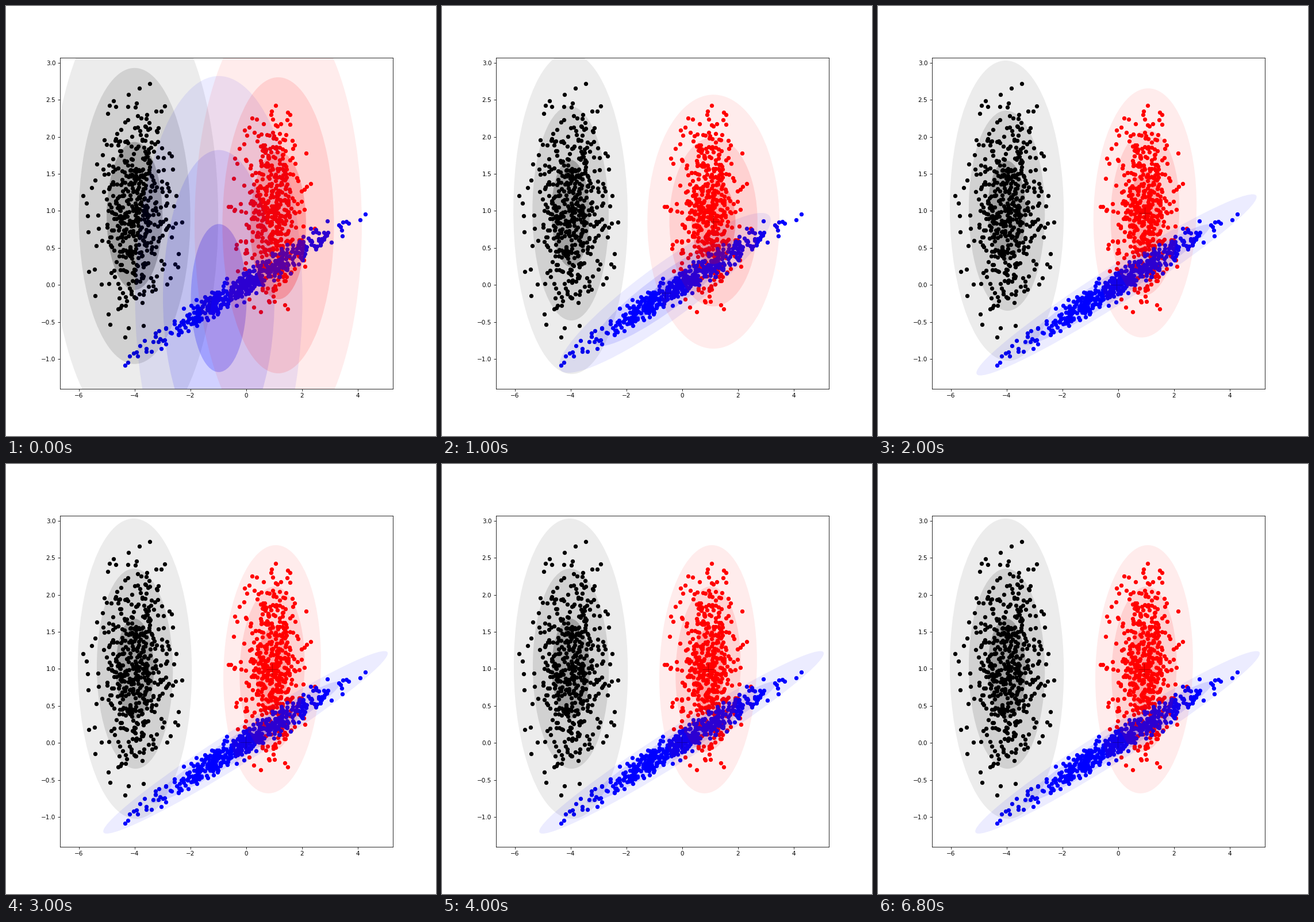
A matplotlib script that plays this animation: 748 px wide and 748 px high, repeating every 8 s.

```python
import numpy as np
import matplotlib.pyplot as plt
from matplotlib.animation import FuncAnimation
from matplotlib.patches import Ellipse

plt.rcParams["font.family"] = "DejaVu Sans"
SIZE, DPI = 748, 74.8
POINTS = 500

rng = np.random.default_rng(12)


def covariance(sx, sy, rho):
    c = rho * sx * sy
    return np.array([[sx * sx, c], [c, sy * sy]])


class Cluster:
    """A Gaussian cloud and a fit that converges to it.

    A fit is mean x, mean y, sigma x, sigma y, correlation.
    """

    def __init__(self, color, start, first, final, rate):
        self.color, self.rate = color, rate
        self.start = np.array([*start, 1, 1, 0])
        self.first, self.final = np.array(first), np.array(final)

    def fit(self, step):
        if step == 0:
            return self.start
        if step > 2:
            return self.final
        left = (1 - self.rate) ** (step - 1)
        return self.final + left * (self.first - self.final)

    def draw_points(self, ax, reach=2.75):
        z = rng.standard_normal((2 * POINTS, 2))
        z = z[np.hypot(*z.T) < reach][:POINTS]
        root = np.linalg.cholesky(covariance(*self.final[2:]))
        x, y = (z @ root.T + self.final[:2]).T
        ax.scatter(x, y, color=self.color, zorder=1)

    def add_rings(self, ax):
        self.rings = [
            ax.add_patch(Ellipse((0, 0), 1, 1, facecolor=self.color, lw=0,
                                 alpha=0.225 / n, zorder=2))
            for n in (1, 2, 3)
        ]
        self.mark, = ax.plot([], [], "+", color="black", ms=20, mew=0.8,
                             alpha=0.5, zorder=1.5)

    def update(self, step):
        x, y, *shape = self.fit(step)
        values, axes = np.linalg.eigh(covariance(*shape))
        width, height = 2 * np.sqrt(values)
        angle = np.degrees(np.arctan2(axes[1, 0], axes[0, 0]))
        for n, ring in enumerate(self.rings, 1):
            ring.set(center=(x, y), width=n * width, height=n * height,
                     angle=angle)
        self.mark.set_data([x], [y])
        self.mark.set_visible(step > 0)
        return [*self.rings, self.mark]


red = Cluster("red", (1.152, 0.806), (1.125, 0.855, 0.79, 0.572, 0),
              (0.935, 0.996, 0.584, 0.559, 0.075), rate=0.84)
blue = Cluster("blue", (-0.98, -0.177), (-0.617, -0.107, 1.266, 0.36, 0.91),
               (-0.02, 0.008, 1.701, 0.411, 0.975), rate=0.94)
black = Cluster("black", (-4, 0.932), (-4, 0.968, 0.684, 0.724, -0.02),
                (-3.99, 1.004, 0.682, 0.676, -0.02), rate=1)

fig = plt.figure(figsize=(SIZE / DPI, SIZE / DPI), dpi=DPI)
ax = fig.add_subplot()
ax.set_xlim(-6.683, 5.270)
ax.set_ylim(-1.402, 3.072)

for cluster in (red, blue, black):
    cluster.draw_points(ax)

# The red rings tint the blue points, so they lie on top.
layers = (black, blue, red)
for cluster in layers:
    cluster.add_rings(ax)


def update(step):
    return [artist for c in layers for artist in c.update(step)]


anim = FuncAnimation(fig, update, frames=8, interval=1000, repeat=True,
                     repeat_delay=0, blit=False)
plt.show()
```
